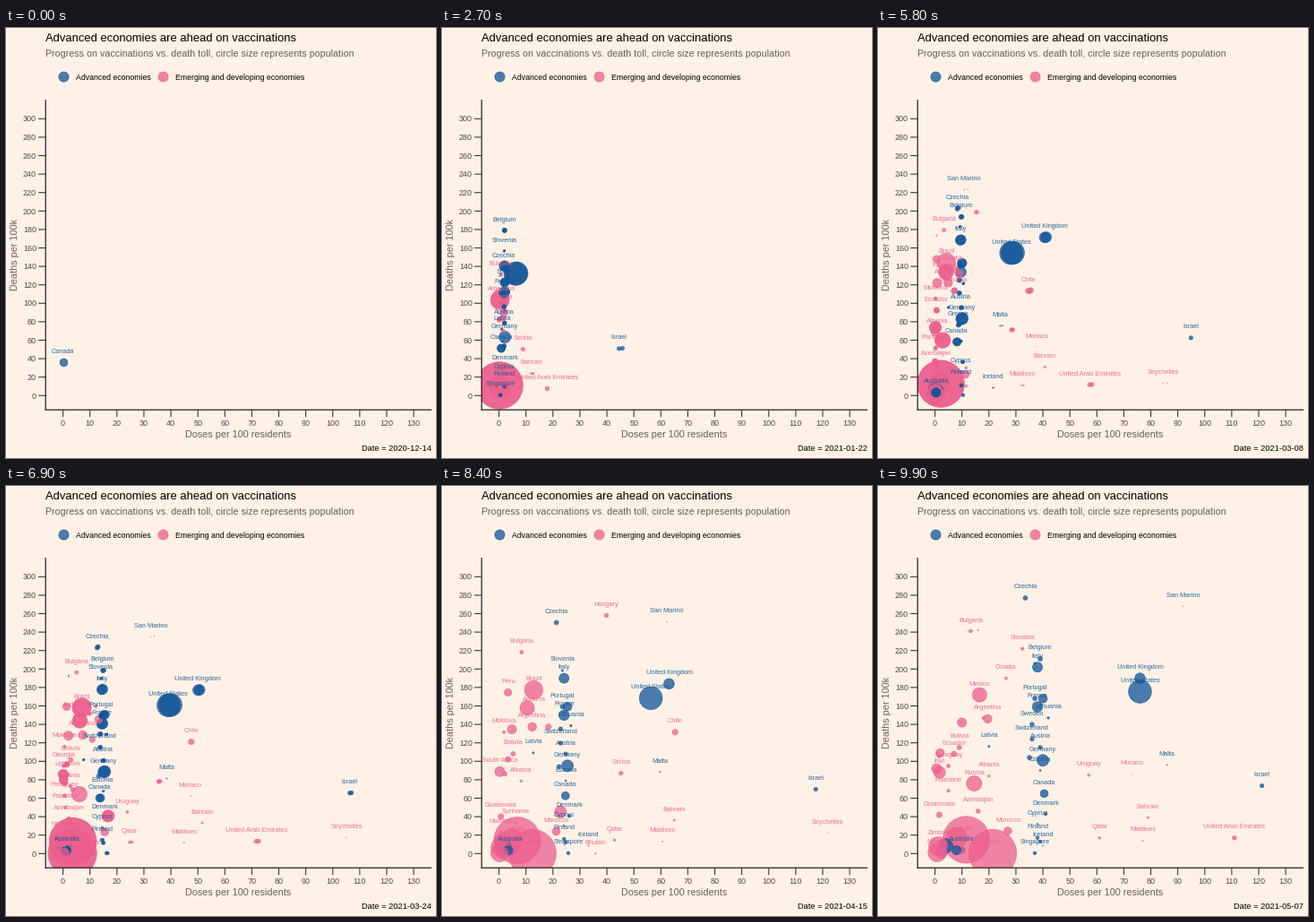
A matplotlib script for the animation above (10 s loop, 480x480 px).

```python
import numpy as np
import matplotlib.pyplot as plt
from matplotlib.animation import FuncAnimation
from matplotlib.patches import Rectangle
from matplotlib.colors import to_rgba

plt.rcParams["font.family"] = "Liberation Sans"

SIZE, DPI = 480, 72          # at 72 dpi one point is one pixel
FRAMES, DAYS = 100, 145
PAPER, BLUE, PINK, GREY = "#FFF1E5", "#0F5499", "#EB5E8D", "#66605C"
START = np.datetime64("2020-12-14")
LEFT, RIGHT, TOP, BOTTOM = 44.2, 475, 80, 426.2
REPORT_RATE = {BLUE: 0.93, PINK: 0.64}

rng = np.random.default_rng(14)
days = np.arange(DAYS)
countries = []


def px(doses):
    return 63.6 + 3.0115 * doses


def py(deaths):
    return 410.3 - 1.03 * deaths


# Shapes of a vaccination campaign, from 0 to 1
def steady(u):
    return u


def gradual(u):
    return 0.23 * u + 0.77 * u ** 3


def rising(u):
    return u ** 1.7


def surge(u):
    return u ** 3


def saturating(u):
    return np.sin(u * np.pi / 2)


def group(color, start, doses_shape, bend, members):
    """Members: population in millions, final doses, first and last deaths.

    Deaths grow as u**bend, so a small bend means an early peak.
    """
    u = np.clip((days - start) / (DAYS - 1 - start), 0, 1)
    for name, (pop, doses, first, last) in members.items():
        reports = (rng.random(DAYS) < REPORT_RATE[color]) | (pop > 300)
        reports[start] = True
        countries.append(dict(
            name=name, color=color, r=0.7 * np.sqrt(pop) + 0.1,
            x=px(doses * doses_shape(u)),
            y=py(first + (last - first) * u ** bend),
            seen=reports & (days >= start)))


group(BLUE, 0, surge, 0.5, {"Canada": (38, 40.5, 36, 65)})
group(BLUE, 6, saturating, 0.55, {"Israel": (8.7, 121.2, 32, 73.5)})
group(BLUE, 8, rising, 0.5, {"United States": (331, 76, 92, 175.5)})
group(BLUE, 13, gradual, 0.85, {
    "Austria": (9, 39, 66, 115), "Belgium": (11.6, 39, 168, 211),
    "Czechia": (10.7, 33.5, 93, 277), "Estonia": (1.3, 39, 13, 90),
    "Finland": (5.5, 38, 9, 17), "France": (65, 38, 96, 159),
    "Greece": (10.4, 35, 36, 104), "Italy": (60.4, 38, 119, 202),
    "Norway": (5.4, 39, 8, 13), "Spain": (46.8, 40, 107, 168)})
group(BLUE, 13, gradual, 0.45, {
    "Cyprus": (0.9, 38, 8, 32), "Denmark": (5.8, 41, 15, 43),
    "Germany": (83.8, 40, 27, 101), "Latvia": (1.9, 20, 30, 116),
    "Lithuania": (2.7, 42, 40, 147), "Portugal": (10.2, 37, 55, 168),
    "Slovenia": (2.1, 37, 110, 206), "Sweden": (10.1, 36, 77, 140),
    "Switzerland": (8.7, 36, 70, 124)})
group(BLUE, 15, steady, 0.35, {
    "Iceland": (0.3, 40, 8.5, 8.5), "United Kingdom": (67.9, 76, 95, 190)})
group(BLUE, 30, rising, 0.9, {
    "Malta": (0.4, 86, 54, 96), "Singapore": (5.9, 37, 0.5, 0.5)})
group(BLUE, 70, gradual, 1, {
    "Australia": (25.5, 10, 3.6, 3.6), "Japan": (126.5, 4, 6, 8.4),
    "New Zealand": (4.8, 4, 0.5, 0.5), "South Korea": (51.3, 8, 3.2, 3.6)})
group(BLUE, 76, steady, 1, {"San Marino": (0.03, 92, 217, 268)})

group(PINK, 14, gradual, 0.95, {
    "Argentina": (45, 19.5, 92, 146), "Bulgaria": (6.9, 13.2, 100, 241),
    "Croatia": (4.1, 26.3, 70, 190), "Hungary": (9.7, 63, 82, 292),
    "Mexico": (129, 16.5, 85, 172), "Poland": (37.8, 35.4, 65, 184),
    "Romania": (19.2, 29, 66, 151), "Slovakia": (5.5, 32.4, 30, 222)})
group(PINK, 20, steady, 0.85, {
    "Bahrain": (1.7, 79, 20, 39), "Monaco": (0.04, 73, 8, 86),
    "Serbia": (8.7, 55, 38, 96), "United Arab Emirates": (9.9, 111, 5, 17)})
group(PINK, 32, gradual, 1, {
    "Bolivia": (11.7, 9, 80, 115), "Brazil": (212, 22, 97, 197),
    "India": (1380, 11.6, 10.7, 15), "Indonesia": (273, 8, 9, 17),
    "Jordan": (10.2, 11, 38, 89), "Panama": (4.3, 18, 112, 147)})
group(PINK, 33, saturating, 1, {"Seychelles": (0.1, 128, 2, 27)})
group(PINK, 41, steady, 1, {
    "Bangladesh": (165, 5.4, 5, 7.2), "Chile": (19.1, 83, 93, 142),
    "Maldives": (0.5, 77, 9, 14), "Morocco": (36.9, 27, 22, 24.5),
    "Turkey": (84.3, 29, 28, 50)})
group(PINK, 60, gradual, 1, {
    "Colombia": (50.9, 10, 114, 142), "Ecuador": (17.6, 7, 86, 108),
    "El Salvador": (6.5, 15, 28, 33), "Iran": (84, 1.7, 68, 88),
    "Lebanon": (6.8, 8, 60, 112), "Pakistan": (221, 1.2, 5.5, 8),
    "Peru": (33, 7, 131, 190), "South Africa": (59.3, 0.6, 80, 92)})
group(PINK, 70, steady, 1, {
    "Qatar": (2.9, 61, 9, 17), "Russia": (146, 14.5, 56, 76),
    "Uruguay": (3.5, 57, 16, 85)})
group(PINK, 73, gradual, 1, {
    "Albania": (2.9, 20, 66, 84), "Andorra": (0.1, 32, 143, 160),
    "Azerbaijan": (10.1, 16, 32, 46), "Guatemala": (17.9, 1.6, 36, 42),
    "Moldova": (4, 4.5, 97, 147), "Montenegro": (0.6, 16, 161, 242),
    "Nigeria": (206, 0.8, 1, 1), "Paraguay": (7.1, 5, 43, 95),
    "Philippines": (109.6, 1.8, 11, 16), "Suriname": (0.6, 15, 29, 36),
    "Ukraine": (43.7, 1.9, 61, 109), "Zimbabwe": (14.9, 3, 9.8, 10.5)})
group(PINK, 92, steady, 1, {
    "Bhutan": (0.8, 62, 0.1, 0.1), "China": (1439, 21.4, 0.3, 0.3),
    "Georgia": (4, 1.5, 93, 105), "Namibia": (2.5, 1.4, 19, 26),
    "Palestine": (5.1, 5, 46, 68), "Thailand": (69.8, 2.4, 0.1, 0.5),
    "Tunisia": (11.8, 3.8, 72, 97)})
countries.sort(key=lambda c: c["name"])

fig = plt.figure(figsize=(SIZE / DPI, SIZE / DPI), dpi=DPI, facecolor=PAPER)
ax = fig.add_axes([0, 0, 1, 1])
ax.set(xlim=(0, SIZE), ylim=(SIZE, 0))
ax.axis("off")


def text(x, y, s, size=9, color="black", **kw):
    return ax.text(x, y, s, fontsize=size, color=color, **kw)


def line(xs, ys, color="black"):
    ax.plot(xs, ys, color=color, lw=1.07, solid_capstyle="butt",
            snap=False, zorder=5)


def dots(x, y, r, color, **kw):
    return ax.scatter(x, y, s=(2 * np.asarray(r)) ** 2, c=color, alpha=0.75,
                      linewidths=0.7, snap=False, **kw)


# Fixed parts: frame, headings, legend and axes
ax.add_patch(Rectangle((0, 0), SIZE, SIZE, fill=False, ec="white", lw=1.07))
text(44, 14.6, "Advanced economies are ahead on vaccinations", 13)
text(44, 32, "Progress on vaccinations vs. death toll, circle size represents population", 10.65, GREY)
for x, color, label in ((63.6, BLUE, "Advanced economies"),
                        (174.8, PINK, "Emerging and developing economies")):
    dots([x], [54.2], [5.6], color)
    text(x + 14.2, 57.6, label, 8.8)

line([LEFT, LEFT], [TOP, BOTTOM + 0.5])
line([LEFT - 0.5, RIGHT], [BOTTOM, BOTTOM])
for v in range(0, 131, 10):
    line([px(v)] * 2, [BOTTOM, BOTTOM + 8], "#333333")
    text(px(v), 444, v, color="#4D4D4D", ha="center")
for v in range(0, 301, 20):
    line([LEFT - 8, LEFT], [py(v)] * 2, "#333333")
    text(34, py(v) + 3.2, v, color="#4D4D4D", ha="right")
text(259.5, 457, "Doses per 100 residents", 10.85, GREY, ha="center")
text(15.3, 253, "Deaths per 100k", 10.85, GREY, rotation=90, ha="right", va="center")

# Moving parts
panel = Rectangle((LEFT, TOP), RIGHT - LEFT, BOTTOM - TOP, fill=False, ec="none")
ax.add_patch(panel)
bubbles = dots([], [], [], BLUE, zorder=2)
bubbles.set_clip_path(panel)
date = text(475, 472, "", 9.2, ha="right")
for c in countries:
    c["label"] = text(0, 0, c["name"], 7.4, c["color"], alpha=0.88,
                      ha="center", zorder=3)
    c["label"].set_clip_path(panel)
    c["half"] = c["label"].get_window_extent().width / 2

# 145 days share 100 frames, so some frames hold two days
frame_of_day = np.round(days * (FRAMES - 1) / (DAYS - 1) + 1).astype(int) - 1


def update(i):
    today = np.flatnonzero(frame_of_day == i)
    spots, sizes, colors, taken = [], [], [], []
    for c in countries:
        c["label"].set_visible(False)
        for d in today[c["seen"][today]]:
            x, y = c["x"][d], c["y"][d]
            spots.append((x, y))
            sizes.append((2 * c["r"]) ** 2)
            colors.append(to_rgba(c["color"], 0.75))
            # Earlier labels win; later ones that would touch them are dropped
            if all(abs(x - tx) > c["half"] + half or abs(y - ty) > 6.2
                   for tx, ty, half in taken):
                taken.append((x, y, c["half"]))
                c["label"].set_position((x, y - 10.5))
                c["label"].set_visible(True)
    bubbles.set_offsets(np.reshape(spots, (-1, 2)))
    bubbles.set_sizes(np.array(sizes))
    bubbles.set_facecolor(colors)
    bubbles.set_edgecolor(colors)
    date.set_text(f"Date = {START + i * (DAYS - 1) // (FRAMES - 1)}")
    return [bubbles, date]


anim = FuncAnimation(fig, update, frames=FRAMES, interval=100,
                     repeat=True, repeat_delay=0)
plt.show()
```
